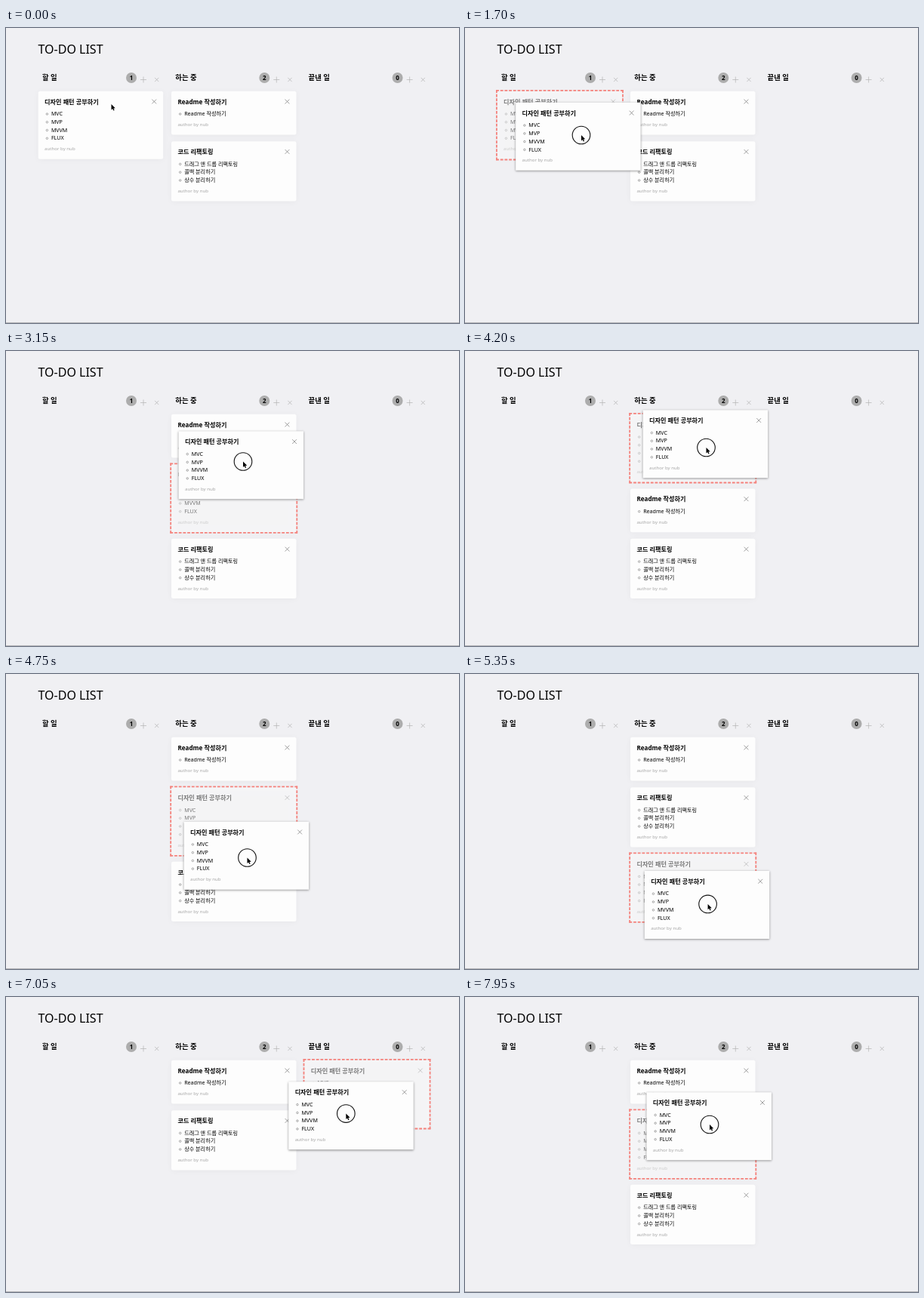
Animation, 600 px wide and 391 px high, one loop 8000 ms. Source, as an HTML page with a canvas:

```html
<!DOCTYPE html>
<html lang="ko">
<head>
<meta charset="utf-8">
<title>TO-DO LIST</title>
<style>
  html, body { margin: 0; width: 100%; height: 100%; overflow: hidden; background: #f0f0f3; }
  canvas { display: block; width: 600px; height: 391px; }
</style>
</head>
<body>
<canvas id="stage"></canvas>
<script>
const WIDTH = 600, HEIGHT = 391, LOOP = 8000, STEP = 50;
const PRESS = 800, DRAG_START = 1150, DRAG_LAG = 50;
const GRIP = { x: 84, y: 42 };
const CARD_LEFT = 42.7, CARD_TOP = 83.7, CARD_WIDTH = 165.5, COLUMN_STEP = 176.3, GAP = 8.7, LINE = 10.75;
const FAMILY = '"Noto Sans", "Noto Sans CJK KR", "Noto Sans CJK", sans-serif';

const canvas = document.getElementById('stage');
const ctx = canvas.getContext('2d');
const ratio = window.devicePixelRatio || 1;
canvas.width = WIDTH * ratio;
canvas.height = HEIGHT * ratio;
ctx.scale(ratio, ratio);

const pattern = { title: '디자인 패턴 공부하기', items: ['MVC', 'MVP', 'MVVM', 'FLUX'] };
const readme = { title: 'Readme 작성하기', items: ['Readme 작성하기'] };
const refactor = { title: '코드 리팩토링', items: ['드래그 앤 드롭 리팩토링', '콜백 분리하기', '상수 분리하기'] };
const headers = [['할 일', 1], ['하는 중', 2], ['끝낸 일', 0]];

// Turning points of the pointer: time, x, y.
const turns = [
  [100, 139.5, 101], [300, 135.5, 126.5], [1150, 135.5, 126.5], [1700, 154, 142],
  [2000, 222, 147], [2700, 289, 156], [3150, 314, 146.5], [3350, 317, 114],
  [3600, 319, 190], [3950, 321, 101], [4200, 319.5, 128], [4500, 321, 213],
  [4750, 319.5, 243.5], [5150, 322, 296], [5600, 321, 310], [5900, 321, 310],
  [6150, 353, 244.5], [6550, 474, 154], [6800, 474, 154], [7700, 333, 160], [7950, 324, 169]
];

// Cubic through the turns that never overshoots them.
function sample(t, axis) {
  const last = turns.length - 1;
  if (t <= turns[0][0]) return turns[0][axis];
  if (t >= turns[last][0]) return turns[last][axis];
  const i = turns.findIndex(k => k[0] > t) - 1;
  const slope = j => (turns[j + 1][axis] - turns[j][axis]) / (turns[j + 1][0] - turns[j][0]);
  const tangent = j => {
    if (j === 0 || j === last) return 0;
    const a = slope(j - 1), b = slope(j);
    return a * b <= 0 ? 0 : 2 * a * b / (a + b);
  };
  const span = turns[i + 1][0] - turns[i][0], u = (t - turns[i][0]) / span, v = 1 - u;
  return v * v * (1 + 2 * u) * turns[i][axis] + u * u * (3 - 2 * u) * turns[i + 1][axis]
    + span * u * v * (v * tangent(i) - u * tangent(i + 1));
}

const pointerAt = t => ({ x: sample(t, 1), y: sample(t, 2) });
const columnX = i => CARD_LEFT + COLUMN_STEP * i;
const cardHeight = card => 47 + LINE * card.items.length;

function layout(cards) {
  let next = CARD_TOP;
  return cards.map(card => {
    const y = next;
    next += cardHeight(card) + GAP;
    return { card, y };
  });
}

// The dragged card takes the place of the card under the pointer, or enters an empty column.
function hover(board, { x, y }) {
  const column = board.findIndex((_, i) => x >= columnX(i) && x <= columnX(i) + CARD_WIDTH);
  if (column < 0) return board;
  const cards = board[column];
  const index = cards.length
    ? layout(cards).findIndex(slot => y >= slot.y && y <= slot.y + cardHeight(slot.card))
    : 0;
  if (index < 0 || cards[index] === pattern) return board;
  const moved = board.map(list => list.filter(card => card !== pattern));
  moved[column].splice(index, 0, pattern);
  return moved;
}

const boards = [];
let current = [[pattern], [readme, refactor], []];
for (let t = 0; t < LOOP; t += STEP) {
  if (t >= DRAG_START) current = hover(current, pointerAt(t));
  boards.push(current);
}

function text(value, x, y, size, color = '#000', weight = 400, align = 'left') {
  ctx.font = `${weight} ${size}px ${FAMILY}`;
  ctx.textAlign = align;
  ctx.fillStyle = color;
  ctx.fillText(value, x, y);
}

function lines(color, width, ...segments) {
  ctx.strokeStyle = color;
  ctx.lineWidth = width;
  ctx.beginPath();
  for (const [x1, y1, x2, y2] of segments) {
    ctx.moveTo(x1, y1);
    ctx.lineTo(x2, y2);
  }
  ctx.stroke();
}

function closeIcon(x, y, r, color) {
  lines(color, 0.7, [x - r, y - r, x + r, y + r], [x - r, y + r, x + r, y - r]);
}

function circle(x, y, r) {
  ctx.beginPath();
  ctx.arc(x, y, r, 0, Math.PI * 2);
}

// Dashes are spread so that every side starts and ends with one.
function dashedSide(x1, y1, x2, y2) {
  const length = Math.hypot(x2 - x1, y2 - y1), dash = 3.8;
  const gaps = Math.round((length - dash) / (dash * 1.5));
  ctx.setLineDash([dash, (length - dash) / gaps - dash]);
  lines('#f5827c', 1.8, [x1, y1, x2, y2]);
}

function dashedBox(x, y, w, h) {
  const out = 0.8, left = x - out, right = x + w + out, top = y - out, bottom = y + h + out;
  ctx.save();
  dashedSide(left - out, top, right + out, top);
  dashedSide(left - out, bottom, right + out, bottom);
  dashedSide(left, top - out, left, bottom + out);
  dashedSide(right, top - out, right, bottom + out);
  ctx.restore();
}

function drawHeader([name, count], x) {
  text(name, x + 5.3, 68.9, 9.4, '#000', 700);
  circle(x + 123.3, 66, 7);
  ctx.fillStyle = '#adadad';
  ctx.fill();
  text(count, x + 123.3, 68.8, 8, '#000', 700, 'center');
  const px = x + 139.3, py = 68.5;
  lines('#b4b4b4', 0.7, [px - 4, py, px + 4, py], [px, py - 4, px, py + 4]);
  closeIcon(x + 157, py, 2.6, '#b0b0b0');
}

function drawCard(card, x, y, mode) {
  const h = cardHeight(card);
  const dragged = mode === 'dragged';
  ctx.save();
  if (mode === 'ghost') ctx.globalAlpha = 0.5;
  ctx.save();
  ctx.shadowColor = dragged ? 'rgba(0,0,0,.45)' : 'rgba(0,0,0,.04)';
  ctx.shadowBlur = (dragged ? 3 : 9) * ratio;
  ctx.shadowOffsetY = (dragged ? 0.8 : 1) * ratio;
  ctx.fillStyle = '#fdfdfd';
  ctx.beginPath();
  ctx.roundRect(x, y, CARD_WIDTH, h, dragged ? 0.5 : 2.5);
  ctx.fill();
  ctx.restore();

  text(card.title, x + 8.4, y + 16.9, 8.15, '#000', 700);
  closeIcon(x + 153.5, y + 13.8, 2.9, '#777');
  card.items.forEach((item, i) => {
    const cy = y + 29.9 + i * LINE;
    circle(x + 11.7, cy + 0.4, 1.25);
    ctx.strokeStyle = '#666';
    ctx.lineWidth = 0.55;
    ctx.stroke();
    text(item, x + 17.2, cy + 2.6, 7.1, '#000', 500);
  });
  text('author by nub', x + 8.4, y + h - 11.6, 6.1, '#a6a6a6');
  ctx.restore();
  if (mode === 'ghost') dashedBox(x, y, CARD_WIDTH, h);
}

function drawPointer(x, y) {
  const outline = [[0, 0], [0, 7.4], [1.7, 5.9], [2.9, 8.6], [4.1, 8.1], [3, 5.5], [5.2, 5.3]];
  ctx.beginPath();
  outline.forEach(([dx, dy]) => ctx.lineTo(x + dx, y + dy));
  ctx.closePath();
  ctx.lineJoin = 'round';
  ctx.strokeStyle = '#fff';
  ctx.lineWidth = 1;
  ctx.stroke();
  ctx.fillStyle = '#000';
  ctx.fill();
}

function draw(t) {
  ctx.fillStyle = '#f0f0f3';
  ctx.fillRect(0, 0, WIDTH, HEIGHT);
  ctx.fillStyle = '#b8b8ba';
  ctx.fillRect(0, 390, WIDTH, 1);
  text('TO-DO LIST', 42.5, 33.5, 16);

  const dragging = t >= DRAG_START;
  boards[t / STEP].forEach((cards, i) => {
    drawHeader(headers[i], columnX(i));
    for (const { card, y } of layout(cards)) {
      drawCard(card, columnX(i), y, dragging && card === pattern ? 'ghost' : 'still');
    }
  });

  const pointer = pointerAt(t);
  if (dragging) {
    const held = pointerAt(t - DRAG_LAG);
    drawCard(pattern, held.x - GRIP.x, held.y - GRIP.y, 'dragged');
  }
  if (t >= PRESS) {
    circle(pointer.x, pointer.y, 11.8);
    ctx.strokeStyle = '#111';
    ctx.lineWidth = 1.1;
    ctx.stroke();
  }
  drawPointer(pointer.x, pointer.y);
}

const start = performance.now();
function frame() {
  const elapsed = (performance.now() - start) % LOOP;
  draw(Math.floor(elapsed / STEP) * STEP);
  requestAnimationFrame(frame);
}
frame();
</script>
</body>
</html>
```
